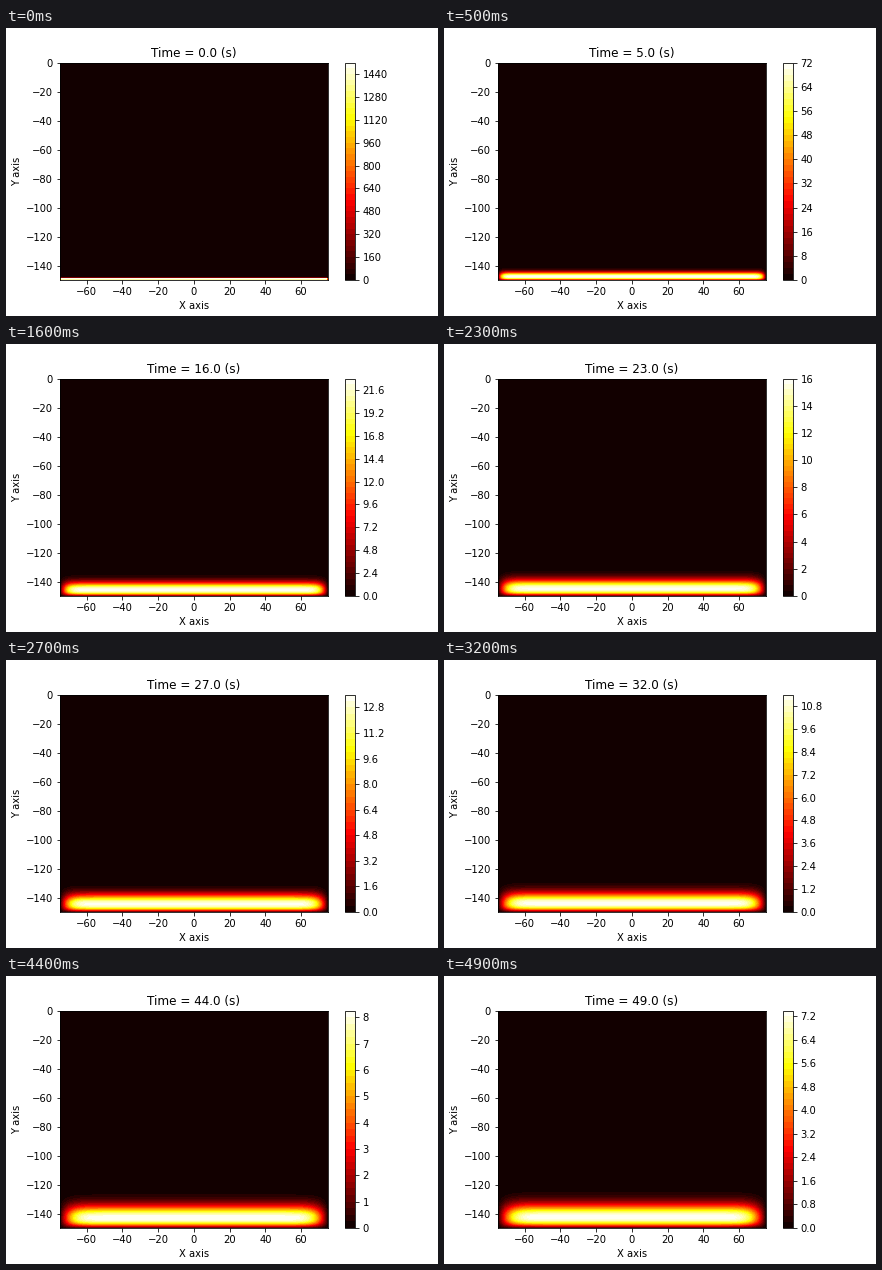
Recreate the animation shown at these times as a matplotlib script. Size 432 by 288 pixels, loop 5000 ms.

```python
import numpy as np
import matplotlib.pyplot as plt
from matplotlib.animation import FuncAnimation

plt.rcParams["font.family"] = "DejaVu Sans"
plt.rcParams["font.size"] = 10

FRAMES = 50
INTERVAL = 100          # ms
POINTS = 200            # grid nodes per side
DIFFUSIVITY = 1.0004    # grid cells squared per second
PEAK = 1500.0

x = np.linspace(-75, 75, POINTS)
y = np.linspace(-150, 0, POINTS)

# Sine modes of the 1-D lattice heat equation with cold walls
cells = POINTS - 1
node = np.arange(POINTS)
mode = np.arange(1, cells)
basis = np.sin(np.pi * np.outer(node, mode) / cells)
decay = 4 * DIFFUSIVITY * np.sin(np.pi * mode / (2 * cells)) ** 2


def diffuse(start, seconds):
    """Spread a 1-D profile for the given time."""
    weights = 2 / cells * (basis.T @ start)
    profile = basis @ (weights * np.exp(-decay * seconds))
    profile[[0, -1]] = 0
    return np.clip(profile, 0, None)


across = np.ones(POINTS)
across[[0, -1]] = 0
upward = (node == 1).astype(float)

fig = plt.figure(figsize=(6, 4), dpi=72, facecolor="white")


def draw(frame):
    seconds = float(frame)
    heat = PEAK * np.outer(diffuse(upward, seconds), diffuse(across, seconds))

    fig.clear()
    fig.subplots_adjust(left=0.125, right=0.9, bottom=0.125, top=0.88)
    ax = fig.add_subplot()
    filled = ax.contourf(x, y, heat, 40, cmap="hot")
    fig.colorbar(filled, ax=ax)
    ax.set_title(f"Time = {seconds:.1f} (s)")
    ax.set_xlabel("X axis")
    ax.set_ylabel("Y axis")
    return []


animation = FuncAnimation(fig, draw, frames=FRAMES, interval=INTERVAL,
                          repeat=True, repeat_delay=0, blit=False)

plt.show()
```
